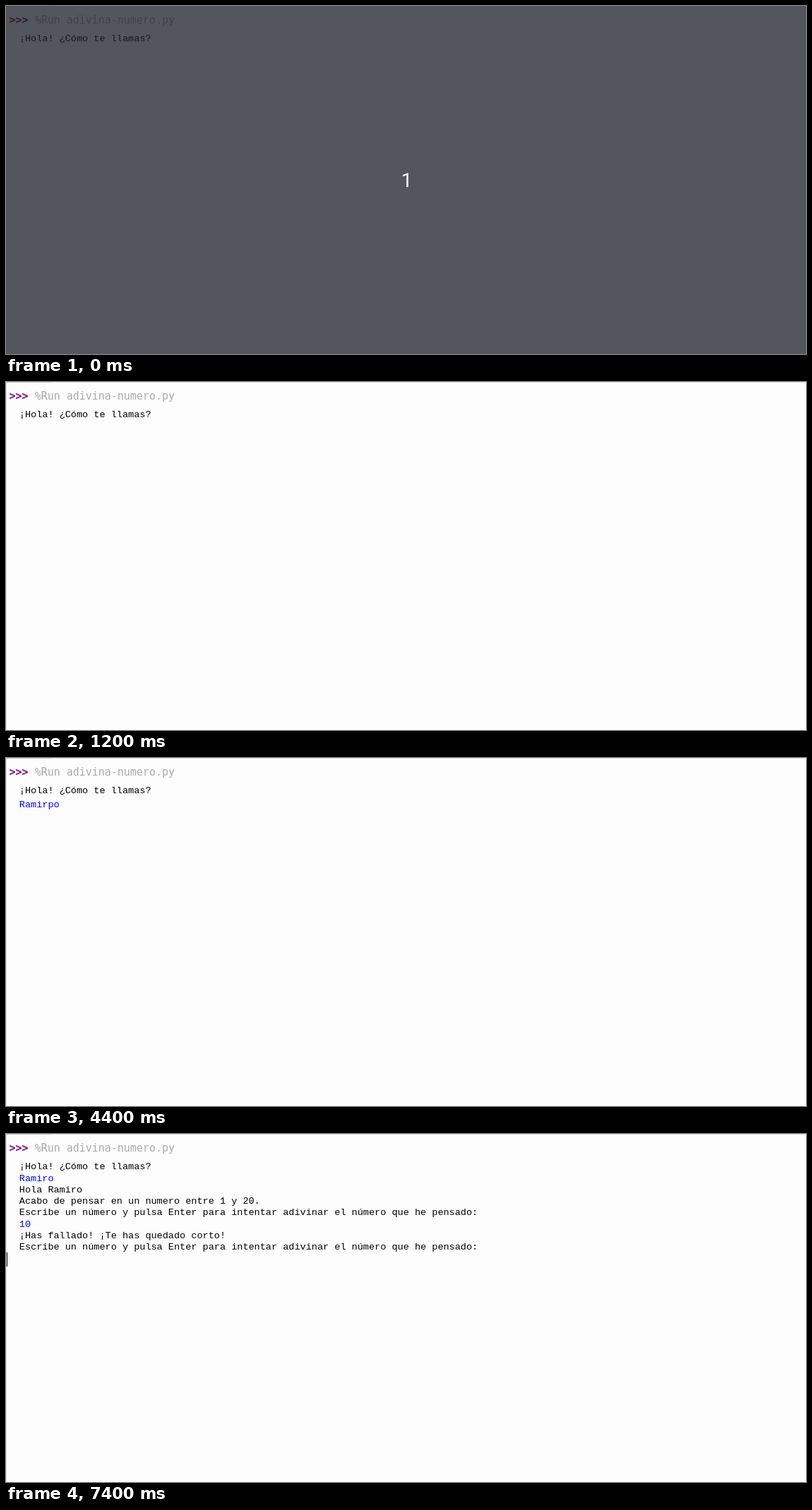
An HTML page with a canvas that plays this animation: 1133x494 px, repeating every 8 s.

```html
<!DOCTYPE html>
<html lang="es">
<head>
<meta charset="utf-8">
<title>Shell</title>
<style>
html, body { margin: 0; width: 100%; height: 100%; overflow: hidden; background: #fdfdfd; }
canvas { display: block; }
</style>
</head>
<body>
<canvas id="stage" width="1133" height="494"></canvas>
<script>
const W = 1133, H = 494, LOOP = 8000;
const SCALE = 0.9018;              // the shell is shown slightly reduced
const CHAR = 9 * SCALE, LINE = 18 * SCALE;
const LEFT = 18.8, FIRST = 50.45;  // origin of the output text
const OUT = '15px "Liberation Mono", monospace';
const CODE = '16.6px "DejaVu Sans Mono", monospace';
const RED = '#cc0000', LINK = '#3a66dd', BLUE = '#0000ff', BLACK = '#000';

const ctx = document.getElementById('stage').getContext('2d');

const ask = 'Escribe un número y pulsa Enter para intentar adivinar el número que he pensado:';
const trace = [
  ['Traceback (most recent call last):', RED],
  ['File "/mnt/56fb7510-3c3a-4323-a437-e0581b60fa80/ramirotelva/Documentos/clases/proyectos/python-inicio/adivina-numero.py", line 7, in <module>', LINK, 2],
  ['nombre_jugador = input()', RED, 4],
  ['File "/home/ramiro-debian/apps/thonny/lib/python3.10/site-packages/thonny/common.py", line 772, in read_one_incoming_message_str', LINK, 2],
  ['msg_str = line_reader()', RED, 4],
  ['KeyboardInterrupt', RED]
];
const reply = [
  ['Ramiro', BLUE],
  ['Hola Ramiro', BLACK],
  ['Acabo de pensar en un numero entre 1 y 20.', BLACK],
  [ask, BLACK]
];
const result = [
  ['10', BLUE],
  ['¡Has fallado! ¡Te has quedado corto!', BLACK],
  [ask, BLACK]
];

// What has been typed from each moment on
const nameKeys = [
  [0, ''], [3600, 'R'], [3700, 'Ra'], [3800, 'Ram'], [4000, 'Rami'], [4100, 'Ramir'],
  [4200, 'Ramirpo'], [4700, 'Ramirp'], [4800, 'Ramir'], [5100, 'Ramiro']
];
const numberKeys = [[0, ''], [7000, '1'], [7100, '10']];

const typed = (keys, t) => keys.filter(k => k[0] <= t).pop()[1];

function text(str, x, y, font, color) {
  ctx.save();
  ctx.translate(x, y);
  ctx.scale(SCALE, SCALE);
  ctx.font = font;
  ctx.fillStyle = color;
  ctx.fillText(str, 0, 0);
  ctx.restore();
}

function rect(x, y, w, h, color) {
  ctx.fillStyle = color;
  ctx.fillRect(x, y, w, h);
}

function row(n, [str, color, indent = 0]) {
  const x = LEFT + indent * CHAR, y = FIRST + n * LINE;
  text(str, x, y, OUT, color);
  if (color === LINK) rect(x, Math.round(y + 1.5), str.length * CHAR, 1, LINK);
}

const rows = (start, list) => list.forEach((line, i) => row(start + i, line));

const prompt = y => text('>>>', 4.6, y, 'bold ' + CODE, '#800080');

function caretOn(t) {
  return t >= 2000 && ((t - 2000) % 900 < 600 || (t >= 7100 && t < 7200));
}

// The line being edited is a little taller than the printed ones
function input(n, str, t) {
  text(str, LEFT, FIRST + n * LINE + 3.6, OUT, BLUE);
  if (!caretOn(t)) return;
  const x = str ? 18.5 + str.length * CHAR : 1;
  rect(x, Math.round(54.7 + (n - 1) * LINE), str ? 1.2 : 1, 20, BLACK);
}

function shell(t) {
  rect(0, 0, W, H, '#fdfdfd');
  rect(0, 0, W, 1, '#e2e2e2');
  rect(0, 0, 66, 1, '#cfcfcb');
  rect(0, 0, 1, H, '#e2e2e2');
  prompt(25.3);
  text('%Run adivina-numero.py', 40.7, 25.3, CODE, '#a9a9a9');
  if (t >= 1100 && t < 1200) return;

  row(0, ['¡Hola! ¿Cómo te llamas?', BLACK]);
  if (t >= 1000 && t < 1100) {
    rows(1, trace);
    prompt(176.4);
  } else if (t < 5500) {
    input(1, typed(nameKeys, t), t);
  } else {
    rows(1, reply);
    if (t < 7400) {
      input(5, typed(numberKeys, t), t);
    } else {
      rows(5, result);
      input(8, '', t);
    }
  }
}

function countdown() {
  rect(0, 0, W, H, 'rgba(27, 31, 39, 0.75)');
  ctx.font = '28px Roboto, sans-serif';
  ctx.fillStyle = '#fff';
  ctx.textAlign = 'center';
  ctx.fillText('1', 567.5, 257);
  ctx.textAlign = 'left';
}

function draw() {
  const t = performance.now() % LOOP;
  shell(t);
  if (t < 100) countdown();
  requestAnimationFrame(draw);
}
draw();
</script>
</body>
</html>
```
